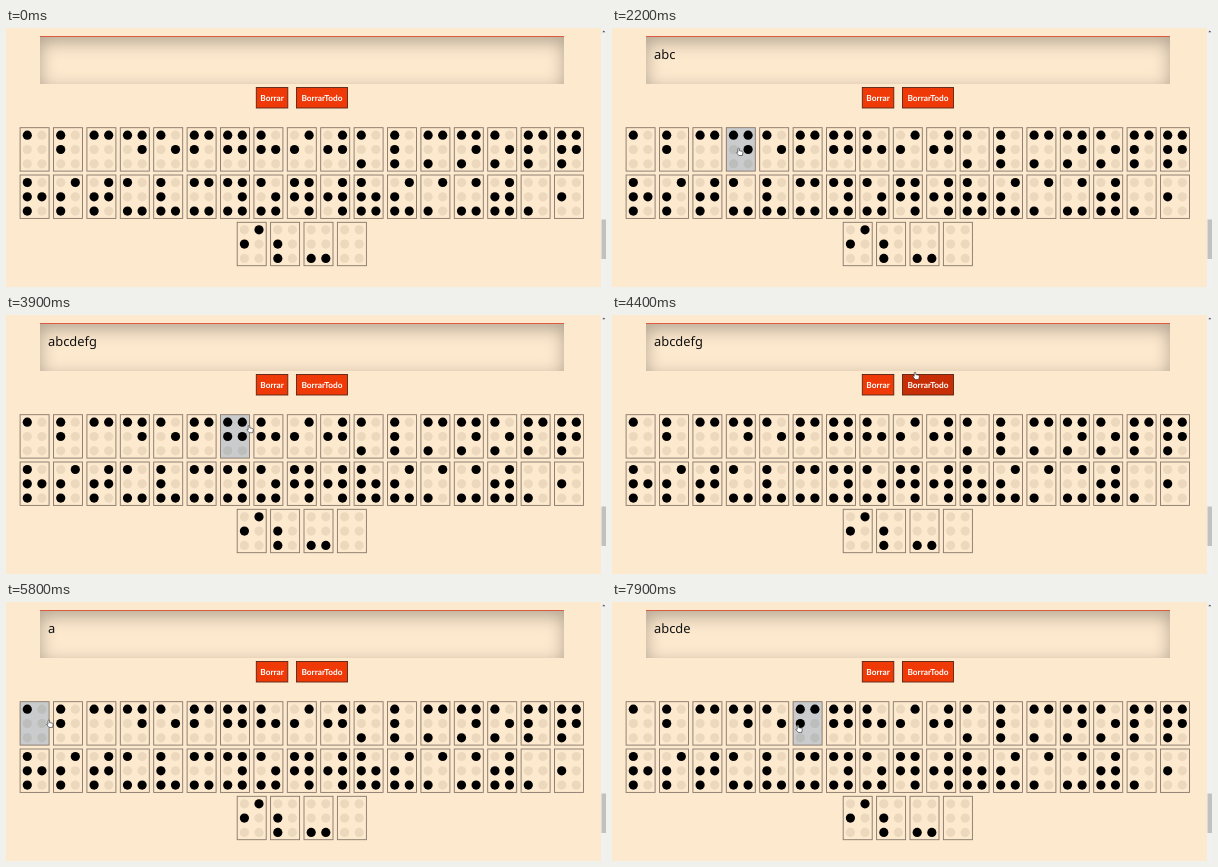
Recreate the animation shown at these times as an HTML page. Size 600 by 259 pixels, loop 8000 ms.

```html
<!DOCTYPE html>
<html lang="es">
<head>
<meta charset="utf-8">
<style>
  html, body { margin: 0; width: 100%; height: 100%; overflow: hidden; background: #fde9ce; }
  #stage { position: relative; width: 600px; height: 259px; overflow: hidden; }
  #field {
    position: absolute; left: 34px; top: 8px; width: 524px; height: 47.5px; box-sizing: border-box;
    border-top: 1px solid #dd5a40;
    box-shadow: inset 0 5px 17px rgba(0, 0, 0, .3);
  }
  svg { position: absolute; left: 0; top: 0; }
  text { font-weight: 500; text-rendering: geometricPrecision; }
  .typed { font: 500 12.9px "Noto Sans", "Open Sans", sans-serif; fill: #111; }
  .label { font: 700 8.3px Lato, "Noto Sans", sans-serif; fill: #fff; text-anchor: middle; }
</style>
</head>
<body>
<div id="stage">
  <div id="field"></div>
  <svg id="scene" width="600" height="259" viewBox="0 0 600 259"></svg>
</div>
<script>
const LOOP = 8000, STEP = 100;
const CARD = { w: 29, h: 43.4, pitchX: 33.4, pitchY: 47.3, top: 99.7, center: 295.8 };
const scene = document.getElementById('scene');
const targets = [];

function add(tag, attrs, parent = scene) {
  const el = document.createElementNS('http://www.w3.org/2000/svg', tag);
  for (const k in attrs) el.setAttribute(k, attrs[k]);
  return parent.appendChild(el);
}

function addTarget(x, y, width, height, stroke, off, on, pad = 0) {
  const box = add('rect', { x, y, width, height, stroke, 'stroke-width': .9 });
  targets.push({ box, left: x, right: x + width, top: y - pad, bottom: y + height, off, on });
}

// The low six bits of a braille character are its dots, down the left column, then the right
function addCard(x, y, braille) {
  addTarget(x, y, CARD.w, CARD.h, '#85776a', '#fde9ce', '#cacbcd');
  const bits = braille.charCodeAt(0);
  for (let n = 0; n < 6; n++) {
    const raised = bits >> n & 1;
    add('circle', {
      cx: x + 7.2 + 14.6 * Math.floor(n / 3), cy: y + 7.5 + 14.3 * (n % 3), r: 4.6,
      fill: raised ? '#000' : 'rgba(70,50,20,.09)'
    });
  }
}

function addButton(x, width, label) {
  addTarget(x, 59.5, width, 20.5, '#5a2416', '#ef3907', '#c72e06', 3);
  add('text', { x: x + width / 2, y: 72.7, class: 'label' }).textContent = label;
}

['⠁⠃⠉⠙⠑⠋⠛⠓⠊⠚⠅⠇⠍⠝⠕⠏⠟', '⠗⠎⠞⠥⠧⠭⠽⠵⠻⠺⠷⠮⠌⠬⠾⠄⠂', '⠊⠆⠤⠀'].forEach((row, r) => {
  const left = CARD.center - ((row.length - 1) * CARD.pitchX + CARD.w) / 2;
  [...row].forEach((cell, i) => addCard(left + CARD.pitchX * i, CARD.top + CARD.pitchY * r, cell));
});
addButton(250.3, 31.5, 'Borrar');
addButton(290.5, 51, 'BorrarTodo');
const typed = add('text', { x: 42, y: 31, class: 'typed' });

// Scrollbar
add('rect', { x: 595, y: 0, width: 5, height: 259, fill: '#f1f1f1' });
add('rect', { x: 595.5, y: 191.5, width: 4.5, height: 39.5, fill: '#c1c1c1' });
add('path', { d: 'M596.3 4.2l1.5 -1.8l1.5 1.8z', fill: '#505050' });

const cursor = add('g', { fill: '#fff', stroke: '#222', 'stroke-width': .6, 'stroke-linejoin': 'round' });
const hand = add('path', {
  d: 'M-.8 4.3V.6Q0 -.5 .8 .6V2.6L3.6 3.2Q4.4 3.5 4.3 4.6L3.7 7.4H.2L-2.2 4.6Q-1.8 3.6 -.8 4.3z'
}, cursor);
const arrow = add('path', { d: 'M0 0V6.6L1.5 5.3L2.5 7.6L3.5 7.1L2.5 5H4.6z' }, cursor);

// Pointer: enter, sweep a to g, clear everything, sweep again
const path = [
  { t: 100, x: 590, y: 236 }, { t: 800, x: 33, y: 122 }, { t: 1200, x: 54, y: 118 },
  { t: 3100, x: 192, y: 122 }, { t: 3800, x: 231, y: 121 }, { t: 4400, x: 303, y: 57 },
  { t: 4700, x: 308, y: 66 }, { t: 5500, x: 34, y: 121 }, { t: 5800, x: 42.8, y: 118 },
  { t: 6900, x: 128, y: 124 }, { t: 7900, x: 186, y: 123 }
];

function pointerAt(t) {
  const next = path.findIndex(p => p.t > t);
  const b = path.at(next), a = path.at(Math.max(next - 1, -2));
  const u = Math.max(0, Math.min(1, (t - a.t) / (b.t - a.t)));
  return { x: a.x + (b.x - a.x) * u, y: a.y + (b.y - a.y) * u };
}

// Letters arrive at a steady pace, once before and once after the text is cleared
function textAt(t) {
  const [first, gap] = t < 4700 ? [900, 480] : [5700, 490];
  return 'abcdefg'.slice(0, Math.max(0, Math.floor((t - first) / gap) + 1));
}

function show(el, on) {
  el.setAttribute('display', on ? 'inline' : 'none');
}

function render(t) {
  const { x, y } = pointerAt(t), visible = t >= path[0].t;
  let hovering = false;
  for (const b of targets) {
    const over = visible && x >= b.left && x <= b.right && y >= b.top && y <= b.bottom;
    b.box.setAttribute('fill', over ? b.on : b.off);
    hovering ||= over;
  }
  cursor.setAttribute('transform', `translate(${x} ${y})`);
  show(cursor, visible);
  show(hand, hovering);
  show(arrow, !hovering);
  typed.textContent = textAt(t);
}

const start = performance.now();
function tick() {
  const t = (performance.now() - start) % LOOP;
  render(Math.floor(t / STEP) * STEP);
  requestAnimationFrame(tick);
}
tick();
</script>
</body>
</html>
```
